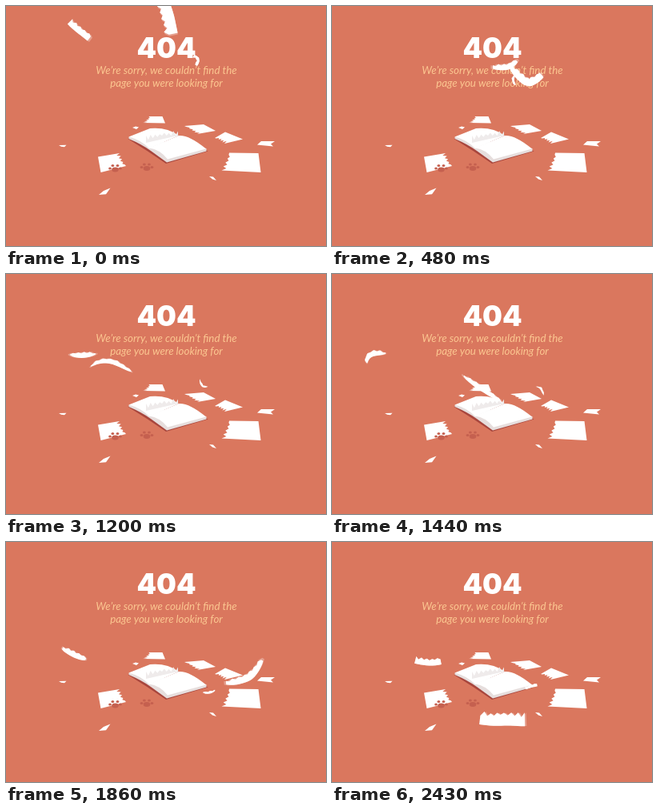
Animation, 400 px wide and 300 px high, one loop 2610 ms. Source, as an HTML page with a canvas:

```html
<!DOCTYPE html>
<html lang="en">
<head>
<meta charset="utf-8">
<title>404</title>
<style>
  html, body { margin: 0; width: 100%; height: 100%; overflow: hidden; background: #da775e; }
  canvas { display: block; width: 100vw; height: 100vh; }
</style>
</head>
<body>
<canvas id="stage" width="400" height="300"></canvas>
<script>
const ctx = document.getElementById('stage').getContext('2d');
const LOOP = 2610, STEP = 30, END = 2430, SAMPLE = 10;
const BACK = '#da775e', COVER = '#a8463d', PAW = '#c5604f', SAND = '#fbc690';

const BOOK = [
  [COVER, 'M152.5 166L181 153L216 162L252.5 181.5L200 197L177 181.5Z'],
  ['#e6dedd', 'M153.5 163.5V166Q170 173 181 181L201 195.5L250.5 181.5V178Z'],
  ['#fff', 'M153.5 163.5L180 153Q201 151 216 162L179 178Q169 167.5 153.5 163.5Z'],
  ['#fff', 'M179 177.5L216 162Q229 161 250 178.5L202 191.5Q192 179 179 177.5Z']
].map(([color, d]) => [color, new Path2D(d)]);

// Sheets on the floor: four corners, torn between the last and the first.
const SHEETS = [
  [195.5,138, 199,146.5, 171,146, 179,138],
  [247,148, 262,156, 239,160, 223,150],
  [274,157.5, 296,166.5, 273,172, 261,165],
  [315.5,184, 318.5,208, 269.5,205.5, 279,183.5],
  [118.5,208, 115,188.5, 142,184, 150,200]
];
const SCRAPS = new Path2D(`M66 174L75.5 173.8L73 176.3L69 175.8Z
  M116 236L122 231L130.5 227.5L125 235.3Z M254 213L259 213.4L263 218L258 216.5Z
  M158 152L162 150.5L166 151.5L163 154Z M319 169L336 169L331 172.5L334 175.5L314 173.5Z`);

const noise = n => { const v = Math.sin(n * 12.9898) * 43758.5453; return v - Math.floor(v); };
const mix = (a, b, u) => a + (b - a) * u;
// How deep the rip cuts at tooth i, as a share of its size.
const bite = i => (i % 2 ? 0.5 + 0.5 * noise(i) : 0.3 * noise(i));

// Smooth curve through [time, x, y] keys.
function splineAt(keys, t) {
  let i = 0;
  while (i < keys.length - 2 && t >= keys[i + 1][0]) i++;
  const a = keys[i], b = keys[i + 1], span = b[0] - a[0], u = (t - a[0]) / span;
  const before = keys[i - 1] || a, after = keys[i + 2] || b;
  const u2 = u * u, u3 = u2 * u;
  return [1, 2].map(c =>
    a[c] * (2 * u3 - 3 * u2 + 1) + b[c] * (3 * u2 - 2 * u3)
    + span * (b[c] - before[c]) / (b[0] - before[0]) * (u3 - 2 * u2 + u)
    + span * (after[c] - a[c]) / (after[0] - a[0]) * (u3 - u2));
}

// The first and last keys only extend the curve beyond the visible motion.
function makePath(keys) {
  const first = keys[0][0], rest = keys[keys.length - 2][0];
  const points = [], lengths = [];
  for (let t = first; t <= keys[keys.length - 1][0]; t += SAMPLE) {
    const p = splineAt(keys, t), q = points[points.length - 1] || p;
    lengths.push((lengths[lengths.length - 1] || 0) + Math.hypot(p[0] - q[0], p[1] - q[1]));
    points.push(p);
  }
  return {
    lengthAt(time) {
      const k = (Math.max(0, Math.min(rest, time)) - first) / SAMPLE, i = Math.floor(k);
      return mix(lengths[i], lengths[i + 1], k - i);
    },
    pointAt(s) {
      let i = 0;
      while (i < lengths.length - 2 && lengths[i + 1] < s) i++;
      const u = (s - lengths[i]) / (lengths[i + 1] - lengths[i] || 1);
      return [0, 1].map(c => mix(points[i][c], points[i + 1][c], u));
    }
  };
}

const FALLING = [
  { length: 15, depth: 4, curl: 0.3, path: makePath([
    [-200, 226,59], [0, 240,67], [480, 226,92], [870, 239,111], [1200, 245,139],
    [1440, 262,144], [1680, 267,178], [1860, 254,188], [2100, 238,185], [2430, 249,180], [2600, 263,177]]) },
  { length: 32, depth: 9, curl: 0.15, path: makePath([
    [-200, 60,-2], [0, 92,30], [240, 150,68], [480, 217,76], [580, 234,64], [870, 186,89],
    [1200, 96,101], [1440, 51,99], [1600, 45,114], [1860, 85,140], [2160, 120,150], [2400, 150,146]]) },
  { length: 56, depth: 17, curl: 0.6, path: makePath([
    [-240, 184,-32], [0, 200,8], [240, 214,60], [480, 245,95], [570, 262,86], [740, 185,152],
    [870, 110,153], [980, 101,122], [1200, 132,109], [1440, 188,143], [1620, 240,174],
    [1860, 302,169], [1990, 324,138], [2190, 272,212], [2430, 213,221], [2670, 180,219]]) }
];

// A sheet bends along its own path, and curls thin with narrow tips in mid-air.
function drawFlying({ path, length, depth, curl }, time) {
  const air = Math.sin(Math.PI * Math.max(0, Math.min(1, time / END)));
  const middle = path.lengthAt(time), width = depth * (1 - curl * air);
  const teeth = 2 * Math.round(length / 9) + 1;
  const normalAt = s => {
    const a = path.pointAt(s - 2), b = path.pointAt(s + 2);
    const dx = b[0] - a[0], dy = b[1] - a[1], d = Math.hypot(dx, dy) || 1;
    return [dy / d, -dx / d];
  };
  const facing = normalAt(middle);
  const side = facing[0] * 0.5 + facing[1] < 0 ? 1 : -1;
  const smooth = [], torn = [];
  for (let i = 0; i <= teeth; i++) {
    const u = i / teeth, s = middle + (u - 0.5) * length;
    const [x, y] = path.pointAt(s), [nx, ny] = normalAt(s);
    const half = side * width / 2 * mix(1, Math.sqrt(Math.sin(Math.PI * u) + 0.03), air);
    const rip = half * (1 - 0.7 * bite(i));
    smooth.push([x - nx * half, y - ny * half]);
    torn.unshift([x + nx * rip, y + ny * rip]);
  }
  ctx.beginPath();
  for (const p of smooth.concat(torn)) ctx.lineTo(...p);
  ctx.fill();
}

// Faint echoes just before and after stand for motion blur.
function drawFalling(sheet, time) {
  ctx.fillStyle = '#fff';
  for (const [shift, alpha] of [[-10, 0.3], [10, 0.3], [0, 1]]) {
    ctx.globalAlpha = alpha;
    drawFlying(sheet, time + shift);
  }
}

function drawTorn([ax, ay, bx, by, cx, cy, dx, dy]) {
  const run = Math.hypot(ax - dx, ay - dy) || 1, teeth = 9;
  ctx.beginPath();
  ctx.moveTo(ax, ay);
  ctx.lineTo(bx, by);
  for (let i = 0; i <= teeth; i++) {
    const u = i / teeth, cut = i === teeth ? 0 : 5 * bite(i) / run;
    ctx.lineTo(mix(cx, dx, u) + (ax - dx) * cut, mix(cy, dy, u) + (ay - dy) * cut);
  }
  ctx.fill();
}

function drawPaw(x, y) {
  ctx.fillStyle = PAW;
  const pad = (dx, dy, rx, ry) => {
    ctx.beginPath();
    ctx.ellipse(x + dx, y + dy, rx, ry, 0, 0, Math.PI * 2);
    ctx.fill();
  };
  pad(0, 2, 4.3, 3);
  for (let i = 0; i < 4; i++) {
    const angle = Math.PI * (1.03 + i * 0.31);
    pad(6.5 * Math.cos(angle), 1 + 4.6 * Math.sin(angle), 1.9, 1.5);
  }
}

function drawBook() {
  for (const [color, path] of BOOK) {
    ctx.fillStyle = color;
    ctx.fill(path);
  }
  // Stubs of the pages torn out along the spine.
  ctx.fillStyle = '#efebeb';
  ctx.beginPath();
  ctx.moveTo(175, 171);
  for (let i = 0; i <= 14; i++) {
    const u = i / 14;
    ctx.lineTo(mix(175, 215, u), mix(162, 155, u) + 6 * bite(i));
  }
  ctx.lineTo(215, 162);
  ctx.fill();
}

function drawText(text, font, color, y) {
  ctx.font = font;
  ctx.fillStyle = color;
  ctx.fillText(text, 200.5, y);
}

function draw(time) {
  ctx.globalAlpha = 1;
  ctx.fillStyle = BACK;
  ctx.fillRect(0, 0, 400, 300);

  ctx.textAlign = 'center';
  drawText('404', '900 35px Inter, sans-serif', '#fff', 65);
  const body = 'italic 13.3px Lato, sans-serif';
  drawText('We’re sorry, we couldn’t find the', body, SAND, 85);
  drawText('page you were looking for', body, SAND, 101);

  ctx.fillStyle = '#fff';
  SHEETS.forEach(drawTorn);
  ctx.fill(SCRAPS);
  drawPaw(136.5, 202.5);
  drawPaw(176, 201);
  drawBook();
  for (const sheet of FALLING) drawFalling(sheet, time);
}

const start = performance.now();
function tick() {
  const t = (performance.now() - start) % LOOP;
  draw(Math.min(END, Math.floor(t / STEP) * STEP));
  requestAnimationFrame(tick);
}
tick();
</script>
</body>
</html>
```
